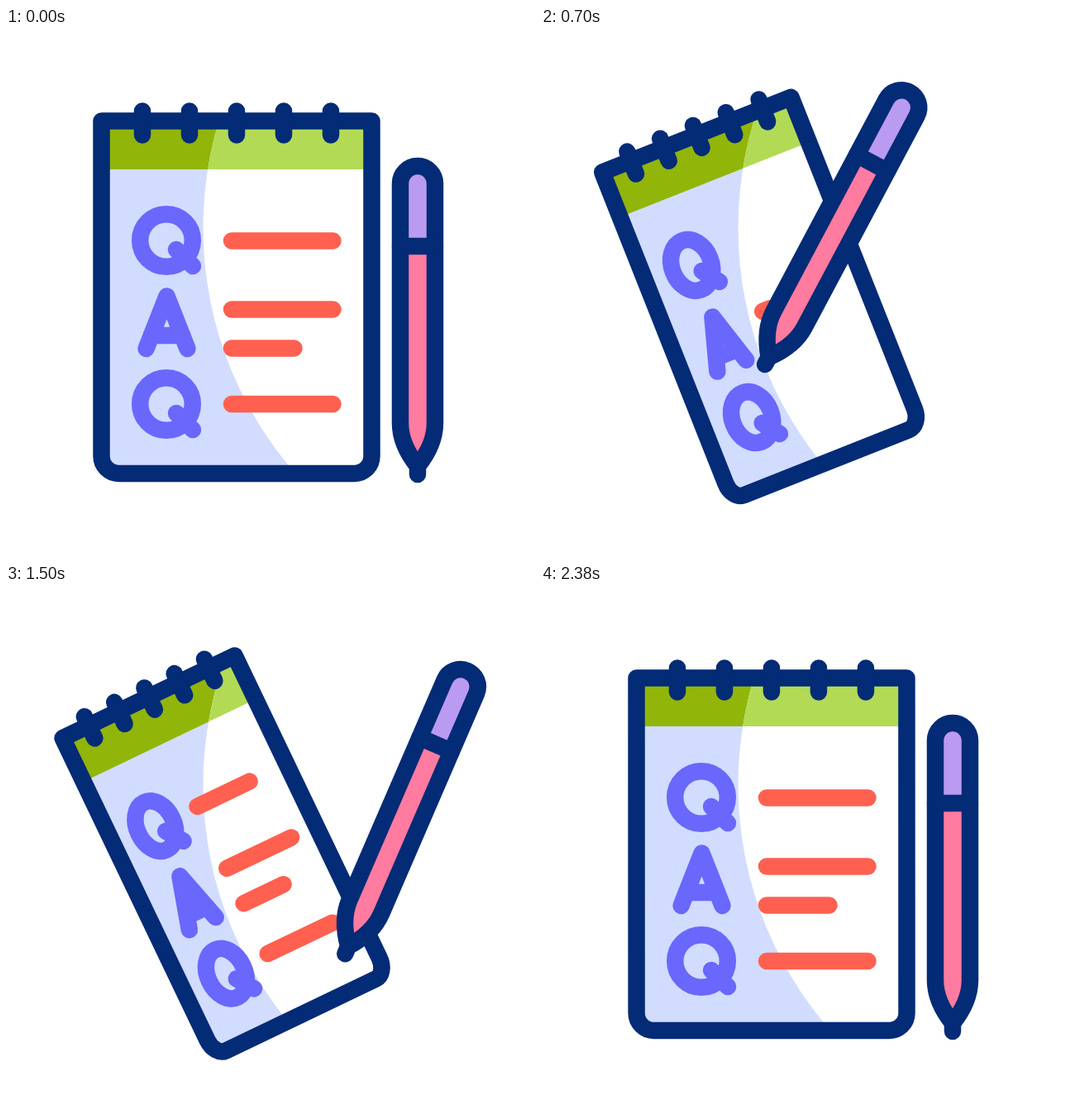
Animation, 640 px wide and 640 px high, one loop 2.4 s. Source, as an HTML page with a canvas:

```html
<!DOCTYPE html>
<html lang="en">
<head>
<meta charset="utf-8">
<title>Notepad and pen</title>
<style>
  html, body { margin: 0; height: 100%; overflow: hidden; background: #fff; }
  canvas { display: block; }
</style>
</head>
<body>
<canvas id="stage" width="640" height="640"></canvas>
<script>
const ctx = document.getElementById('stage').getContext('2d');
const LOOP = 2400, STROKE = 20.5;
const NAVY = '#042b76', RED = '#ff6050', VIOLET = '#6a67fc';

// Smooth monotone curve through [time, value] keys.
function track(...keys) {
  const n = keys.length - 1;
  const slope = i => (keys[i + 1][1] - keys[i][1]) / (keys[i + 1][0] - keys[i][0]);
  const tangent = i => {
    if (i === 0 || i === n) return 0;
    const a = slope(i - 1), b = slope(i);
    return a * b > 0 ? 2 * a * b / (a + b) : 0;
  };
  return t => {
    if (t <= keys[0][0]) return keys[0][1];
    if (t >= keys[n][0]) return keys[n][1];
    const i = keys.findIndex(k => k[0] > t) - 1;
    const [t0, v0] = keys[i], [t1, v1] = keys[i + 1];
    const d = t1 - t0, u = (t - t0) / d, w = 1 - u;
    return v0 * (1 + 2 * u) * w * w + v1 * u * u * (3 - 2 * u)
      + d * u * w * (tangent(i) * w - tangent(i + 1) * u);
  };
}

const padTilt = track([0, 0], [320, 1.85], [540, 9], [700, 21.6], [1020, 27], [1200, 27.5],
  [1500, 25.6], [1640, 23], [1860, 7.3], [2180, .9], [2400, 0]);
const penTilt = track([0, 0], [320, 13.1], [600, 28], [1200, 28], [1500, 23.4],
  [1860, 4.5], [2180, 0]);
const penX = track([0, 498], [320, 389], [620, 270], [700, 271], [1020, 290],
  [1080, 296], [1500, 410], [1640, 439], [1860, 481], [2200, 498]);
const penY = track([0, 540], [320, 481.5], [610, 404], [700, 407], [1000, 435],
  [1040, 435], [1260, 402], [1500, 446], [1860, 524], [2200, 540]);

const lines = [
  { y: 257.5, width: 122.5, shown: track([0, 1], [320, .6], [600, 0], [1200, 0], [1500, .81], [1640, 1]) },
  { y: 340.5, width: 122.5, shown: track([320, 1], [640, 0], [700, .1], [1020, .38], [1300, 1]) },
  { y: 387.5, width: 75.5, shown: track([320, 1], [640, 0], [1080, 0], [1420, 1]) },
  { y: 455, width: 122.5, shown: track([320, 1], [660, 0], [1080, 0], [1480, 1]) }
];

const letterQ = y => `M162.2 ${y}a31.8 31.8 0 1 1 63.6 0a31.8 31.8 0 1 1 -63.6 0z` +
  `M206 ${y + 11}l20 20`;
const PAD = 'M115.5 112.5H442.5V518a21 21 0 0 1 -21 21H136.5a21 21 0 0 1 -21 -21z';
const BAND = 'M115.5 112.5H442.5V171H115.5z';
const RINGS = [165, 222, 279, 336, 393].map(x => `M${x} 100.5v29`).join('');
const LETTERS = letterQ(257) + 'M169.5 388L194.5 324.5L219.5 388M175.5 372H213.5' + letterQ(455);

// Pen with the tip at the origin.
const PEN = 'M-21 -352a21 21 0 0 1 42 0V-62Q21 -36 0 -10Q-21 -36 -21 -62z';
const PEN_TOP = 'M-21 -352a21 21 0 0 1 42 0V-276H-21z';
const PEN_MARKS = 'M-21 -276H21M0 -10V0';

// Shapes are transformed, line weight is not.
function shape(d, matrix) {
  const path = new Path2D();
  path.addPath(new Path2D(d), matrix);
  return path;
}
function fill(path, color) {
  ctx.fillStyle = color;
  ctx.fill(path);
}
function stroke(path, color) {
  ctx.strokeStyle = color;
  ctx.stroke(path);
}

function drawPad(t) {
  const a = padTilt(t);
  const matrix = new DOMMatrix().translate(279 - .56 * a, 325.75 + .075 * a)
    .rotate(-a).scale(1 - .0115 * a, 1).translate(-279, -325.75);
  const pad = shape(PAD, matrix), band = shape(BAND, matrix);

  fill(pad, '#d2dcfe');
  fill(band, '#91b508');
  ctx.save();
  ctx.beginPath();
  ctx.arc(689.5, 242, 451, 0, 2 * Math.PI);
  ctx.clip();
  fill(pad, '#fff');
  fill(band, '#b2da55');
  ctx.restore();

  for (const { y, width, shown } of lines) {
    const part = shown(t);
    if (part > 0) stroke(shape(`M273 ${y}h${width * part}`, matrix), RED);
  }
  stroke(shape(LETTERS, matrix), VIOLET);
  stroke(pad, NAVY);
  stroke(shape(RINGS, matrix), NAVY);
}

function drawPen(t) {
  const matrix = new DOMMatrix().translate(penX(t), penY(t)).rotate(penTilt(t));
  const body = shape(PEN, matrix);
  fill(body, '#ff7b9f');
  fill(shape(PEN_TOP, matrix), '#bb9af2');
  stroke(body, NAVY);
  stroke(shape(PEN_MARKS, matrix), NAVY);
}

function frame() {
  const t = performance.now() % LOOP;
  ctx.fillStyle = '#fff';
  ctx.fillRect(0, 0, 640, 640);
  ctx.lineWidth = STROKE;
  ctx.lineCap = ctx.lineJoin = 'round';
  drawPad(t);
  drawPen(t);
  requestAnimationFrame(frame);
}
frame();
</script>
</body>
</html>
```
